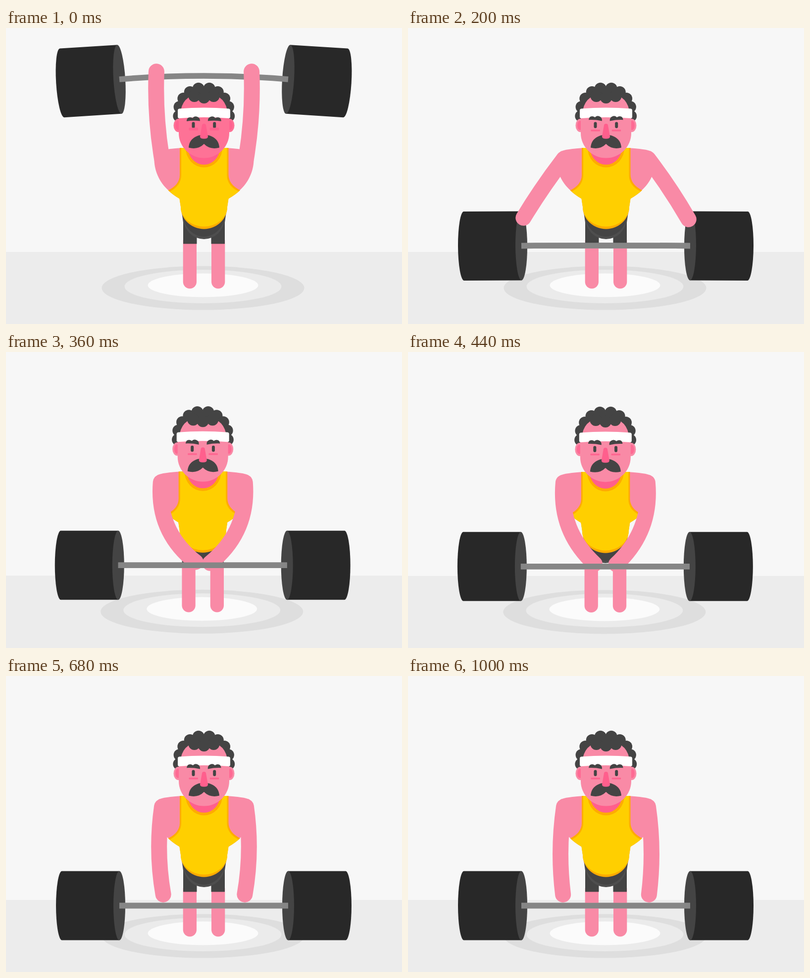
Animation, 800 px wide and 600 px high, one loop 1040 ms. Source, as an HTML page:

```html
<!DOCTYPE html>
<html lang="en">
<head>
<meta charset="utf-8">
<title>Weightlifter</title>
<style>
  html, body { margin: 0; width: 100%; height: 100%; overflow: hidden; background: #f7f7f7; }
  svg { display: block; width: 800px; height: 600px; }
  .skin { fill: #f98aa6; }
  .arm { fill: none; stroke: #f98aa6; stroke-width: 32; stroke-linecap: round; }
  .rose { fill: #ff5f8d; }
  .dark { fill: #444; }
  .bar { fill: none; stroke: #868686; stroke-width: 11.5; }
</style>
</head>
<body>
<svg viewBox="0 0 800 600">
  <defs>
    <g id="disc">
      <path fill="#282828" d="M0-70H-116A12 70 0 0 0-116 70H0Z"/>
      <ellipse class="dark" rx="12" ry="70"/>
    </g>
    <g id="leg">
      <path class="skin" d="M357.7 430H385V514.5A13.6 13.6 0 0 1 357.7 514.5Z"/>
      <path class="dark" d="M353.5 362L358 394V437.5H385.5V410L400 380V362Z"/>
    </g>
    <path id="shoulder" class="skin" d="M358 243Q318 245 308 250.5L299.5 268C300 292 312 315 328 329L360 315Z"/>
    <g id="curls" class="dark"></g>
    <g id="ear">
      <ellipse class="face" cx="348" cy="197.5" rx="9.5" ry="13.5"/>
      <ellipse class="rose" cx="347.5" cy="197.5" rx="5.5" ry="9.5" opacity=".75"/>
    </g>
    <g id="features">
      <rect class="dark" x="375.5" y="190.5" width="6" height="12.5" rx="3"/>
      <rect class="rose cheek" x="369.5" width="18.5" rx="1" opacity=".85"/>
      <path class="dark brow" d="M365 189Q365 181 372 181Q375 181 377 182.5Q380 178.500 385 179.500Q392 181 392 188.500Q378 187 365 189Z"/>
    </g>
    <path id="whisker" class="dark" d="M400.500 219Q393 215.500 385 219.500Q370 226 369 242.500Q388 247.500 400.500 234.500Z"/>
  </defs>

  <g id="scene">
    <rect x="-20" y="-20" width="840" height="640" fill="#f7f7f7"/>
    <rect x="-20" y="454" width="840" height="170" fill="#ececec"/>
    <ellipse cx="398" cy="527" rx="204.500" ry="44.500" fill="#dedede"/>
    <ellipse cx="398" cy="524" rx="158.500" ry="34" fill="#ebebeb"/>
    <ellipse cx="398" cy="521.500" rx="111.500" ry="24" fill="#fbfbfb"/>

    <use id="discL" href="#disc"/>
    <use id="discR" href="#disc"/>
    <path id="barBack" class="bar"/>

    <use href="#leg"/>
    <use href="#leg" transform="matrix(-1 0 0 1 800 0)"/>
    <path fill="#4e4e4e" d="M358.500 386A41.500 42 0 0 0 441.500 386Z"/>
    <path class="dark" d="M356.500 372A43.500 51 0 0 0 443.500 372Z"/>

    <use href="#shoulder"/>
    <use href="#shoulder" transform="matrix(-1 0 0 1 800 0)"/>
    <path fill="#ffab00" d="M351 243H449.500V296Q449 317 473 329Q462 339 449.500 346L447 362.500A47 45 0 0 1 353 362.500L350.500 346Q338 339 327.500 329Q352 317 351 296Z"/>
    <path fill="#ffcf00" d="M354 243H446.500V298Q446 319 470 331.500Q461 339 449.500 346L447 362.500A47 40 0 0 1 353 362.500L350.500 346Q339 339 331 331.500Q354 319 354 298Z"/>
    <path fill="#ffab00" d="M363 243A37 39.500 0 0 0 437 243Z"/>
    <path class="rose" d="M368 243A32 34 0 0 0 432 243Z"/>

    <path id="armR" class="arm"/>
    <path id="armL" class="arm"/>

    <ellipse class="dark" cx="400" cy="165" rx="52" ry="46"/>
    <use href="#curls"/>
    <use href="#curls" transform="matrix(-1 0 0 1 799.500 0)"/>
    <use href="#ear"/>
    <use href="#ear" transform="matrix(-1 0 0 1 800 0)"/>
    <path class="face" d="M349 183L353.500 165Q357 149 368.500 141H431.500Q443 149 446.500 165L451 183V213A51 50.500 0 0 1 349 213Z"/>
    <g class="dark">
      <circle cx="380.500" cy="138" r="12"/>
      <circle cx="400" cy="141" r="12"/>
      <circle cx="419.500" cy="138" r="12"/>
    </g>
    <path fill="#fff" d="M350 163.500Q400 159.500 450 163.500Q453 164 453 167V180Q453 183 450 183Q400 179 350 183Q347 183 347 180V167Q347 164 350 163.500Z"/>
    <use href="#features"/>
    <use href="#features" transform="matrix(-1 0 0 1 799.700 0)"/>
    <use href="#whisker"/>
    <use href="#whisker" transform="matrix(-1 0 0 1 800 0)"/>
    <path class="rose" d="M396 197Q396.500 194 400 194T404 197L408 220Q408 224.500 400 224.500T392 220Z"/>

    <path id="barFront" class="bar"/>
  </g>
</svg>
<script>
const LOOP = 1040, STEP = 40;
const TOP = 104, FLOOR = 465.5;          // height of the bar ends
const IMPACT = 240, BOUNCE = 305, REBOUND = 34, SHAKE = 280;
const SHOULDER = { x: 315, y: 265 };

const $ = id => document.getElementById(id);
const all = sel => document.querySelectorAll(sel);
const clamp = v => Math.min(1, Math.max(0, v));
const mix = (a, b, k) => a + (b - a) * k;

const linear = k => k;
const easeOut = k => Math.sin(k * Math.PI / 2);
const easeInOut = k => (1 - Math.cos(k * Math.PI)) / 2;

// angle is in degrees from hanging straight down, positive towards the body
const poses = [
  { at: 0, angle: -176.4, reach: 177, bend: 9 },
  { at: 80, angle: -142.4, reach: 121, bend: 58, ease: linear },
  { at: 200, angle: -34.3, reach: 145, bend: -4, ease: linear },
  { at: 360, angle: 23.5, reach: 176, bend: -47, ease: easeOut },
  { at: 740, angle: -0.6, reach: 178, bend: -12, ease: easeInOut }
];

function armPose(t) {
  const n = poses.findIndex(p => p.at > t);
  if (n < 0) return poses[poses.length - 1];
  const a = poses[n - 1], b = poses[n];
  const k = b.ease((t - a.at) / (b.at - a.at));
  return {
    angle: mix(a.angle, b.angle, k),
    reach: mix(a.reach, b.reach, k),
    bend: mix(a.bend, b.bend, k)
  };
}

function armPath({ angle, reach, bend }, drop) {
  const rad = angle * Math.PI / 180;
  const ux = Math.sin(rad), uy = Math.cos(rad);
  const { x, y } = SHOULDER;
  const elbowX = x + ux * reach / 2 + uy * bend;
  const elbowY = y + uy * reach / 2 - ux * bend;
  return `M${x} ${y}Q${elbowX} ${elbowY} ${x + ux * reach} ${y + uy * reach + drop}`;
}

function barbell(t) {
  const fall = Math.min(FLOOR, TOP + 1.583 * t + 0.00052 * t * t);
  const hop = clamp((t - IMPACT) / BOUNCE);
  return {
    y: fall - REBOUND * 4 * hop * (1 - hop),
    flex: (FLOOR - fall) / (FLOOR - TOP)
  };
}

function drawBarbell(t) {
  const { y, flex } = barbell(t);
  const bar = `M229 ${y}Q399.5 ${y - 14 * flex} 570 ${y}`;
  const tilt = `rotate(${-3.6 * flex})`;
  $('barBack').setAttribute('d', bar);
  $('barFront').setAttribute('d', bar);
  // the hands wrap the bar until they let go
  $('barFront').style.display = t < STEP ? 'none' : '';
  $('discL').setAttribute('transform', `translate(229 ${y})${tilt}`);
  $('discR').setAttribute('transform', `translate(570 ${y})scale(-1 1)${tilt}`);
}

function drawArms(t) {
  const pose = armPose(t);
  const lag = 3 * Math.sin(Math.PI * clamp(t / 480));
  $('armL').setAttribute('d', armPath(pose, 0));
  $('armR').setAttribute('d', armPath(pose, lag));
}

function drawFace(t) {
  const flush = 1 - clamp(t / 200);
  const [r, g, b] = [mix(249, 254, flush), mix(138, 114, flush), mix(166, 150, flush)];
  all('.face').forEach(e => e.setAttribute('fill', `rgb(${r},${g},${b})`));
  all('.cheek').forEach(e => {
    e.setAttribute('y', 206 - 4 * flush);
    e.setAttribute('height', 3.5 + 2 * flush);
  });
  all('.brow').forEach(e => e.setAttribute('transform', `rotate(${6 * (1 - flush)} 392 188)`));
}

function drawShake(t) {
  const age = t - IMPACT;
  const kick = age < 0 ? 0 : Math.cos(Math.PI * age / STEP) * (1 - clamp(age / SHAKE));
  $('scene').setAttribute('transform', `translate(${4 * kick} ${4 * kick ** 3})`);
}

function draw(t) {
  drawBarbell(t);
  drawArms(t);
  drawFace(t);
  drawShake(t);
}

for (let i = 0; i < 5; i++) {
  const turn = (12.7 + 21 * i) * Math.PI / 180;
  const x = 400 - 51 * Math.sin(turn), y = 172.500 - 51 * Math.cos(turn);
  $('curls').innerHTML += `<circle cx="${x}" cy="${y}" r="12"/>`;
}
$('armR').setAttribute('transform', 'matrix(-1 0 0 1 800 0)');

const start = performance.now();
function tick() {
  const t = (performance.now() - start) % LOOP;
  draw(Math.floor(t / STEP) * STEP);
  requestAnimationFrame(tick);
}
tick();
</script>
</body>
</html>
```
